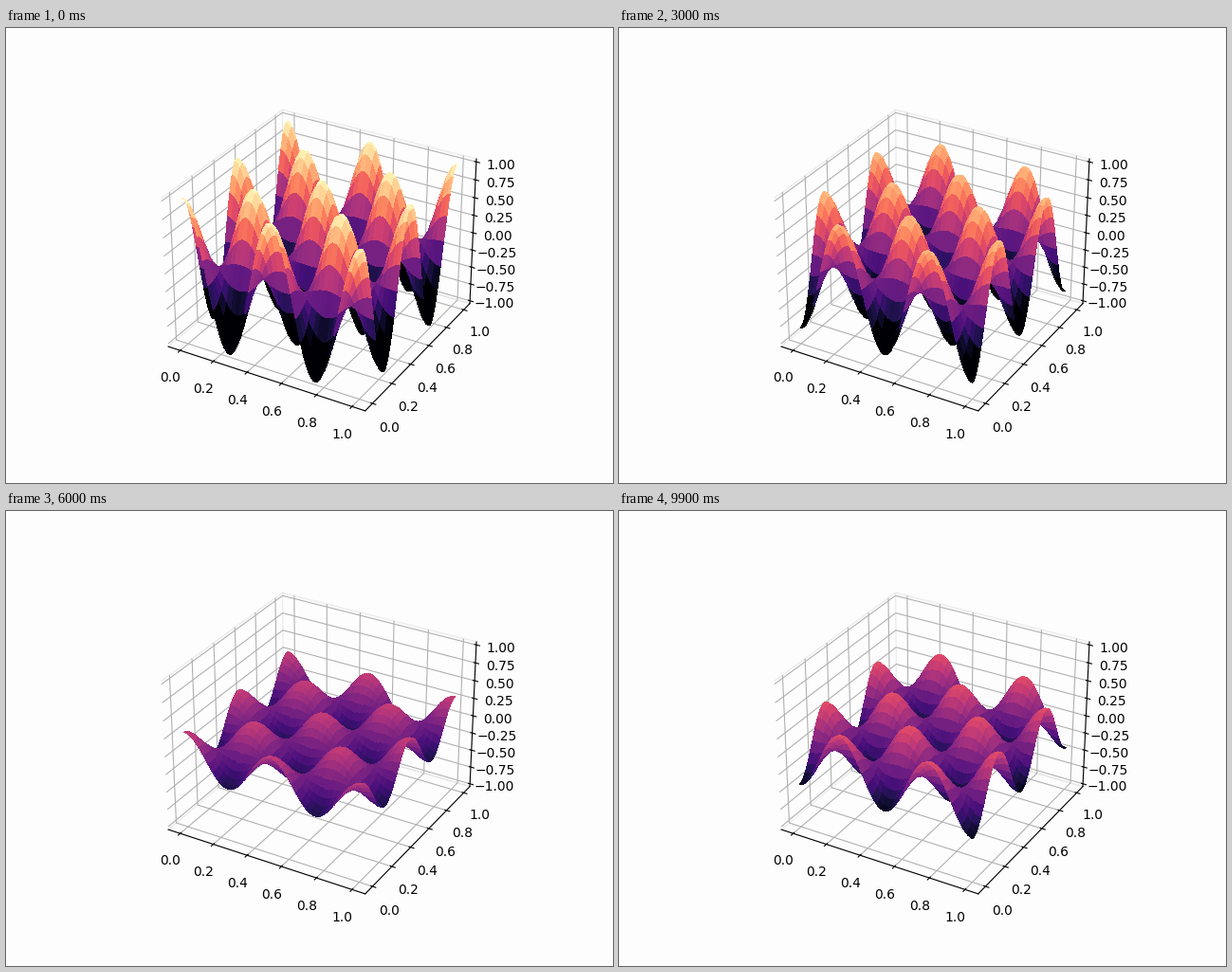
Write a matplotlib script that moves like this. It is 640x480 px and loops after 10000 ms.

```python
import numpy as np
import matplotlib.pyplot as plt
from matplotlib.animation import FuncAnimation
from mpl_toolkits.mplot3d.art3d import Poly3DCollection

FRAMES = 100
INTERVAL = 100   # ms
PERIOD = 75      # frames per oscillation
CELLS = 150      # fine grid intervals per side
STRIDE = 4       # fine intervals per coloured patch
PAPER = "#fdfdfd"

grid = np.linspace(0, 1, CELLS + 1)


def standing_wave(x, y):
    return np.cos(4 * np.pi * x) * np.cos(4 * np.pi * y)


def patch_outline(a, b, c, d):
    """Perimeter of the patch spanning rows a..b and columns c..d."""
    x = np.concatenate([grid[c:d], np.full(b - a, grid[d]),
                        grid[d:c:-1], np.full(b - a, grid[c])])
    y = np.concatenate([np.full(d - c, grid[a]), grid[a:b],
                        np.full(d - c, grid[b]), grid[b:a:-1]])
    return np.column_stack([x, y, standing_wave(x, y)])


def padded(low, high, pad=1 / 48):
    """Limits widened on both sides by a share of their span."""
    extra = (high - low) * pad
    return low - extra, high + extra


stops = [*range(0, CELLS, STRIDE), CELLS]
spans = list(zip(stops[:-1], stops[1:]))
outlines = [patch_outline(a, b, c, d) for a, b in spans for c, d in spans]
heights = np.array([p[:, 2].mean() for p in outlines])

fig = plt.figure(figsize=(6.4, 4.8), dpi=100, facecolor=PAPER)
ax = fig.add_subplot(projection="3d", facecolor=PAPER)
ax.view_init(elev=30, azim=-60)

ax.set_xlim(padded(-0.05, 1.05))
ax.set_ylim(padded(-0.05, 1.05))
ax.set_zlim(padded(-1, 1))
for axis in (ax.xaxis, ax.yaxis, ax.zaxis):
    axis.pane.set_facecolor("none")
    axis.pane.set_edgecolor("#dddddd")

surface = Poly3DCollection(outlines, cmap="magma", norm=plt.Normalize(-0.5, 1),
                           linewidth=0, antialiased=False)
surface.set_array(heights)
ax.add_collection3d(surface)


def update(frame):
    swing = np.cos(2 * np.pi * frame / PERIOD)
    surface.set_verts([p * (1, 1, swing) for p in outlines])
    surface.set_array(heights * swing)
    return (surface,)


anim = FuncAnimation(fig, update, frames=FRAMES, interval=INTERVAL,
                     repeat=True, repeat_delay=0, blit=False)
plt.show()
```
